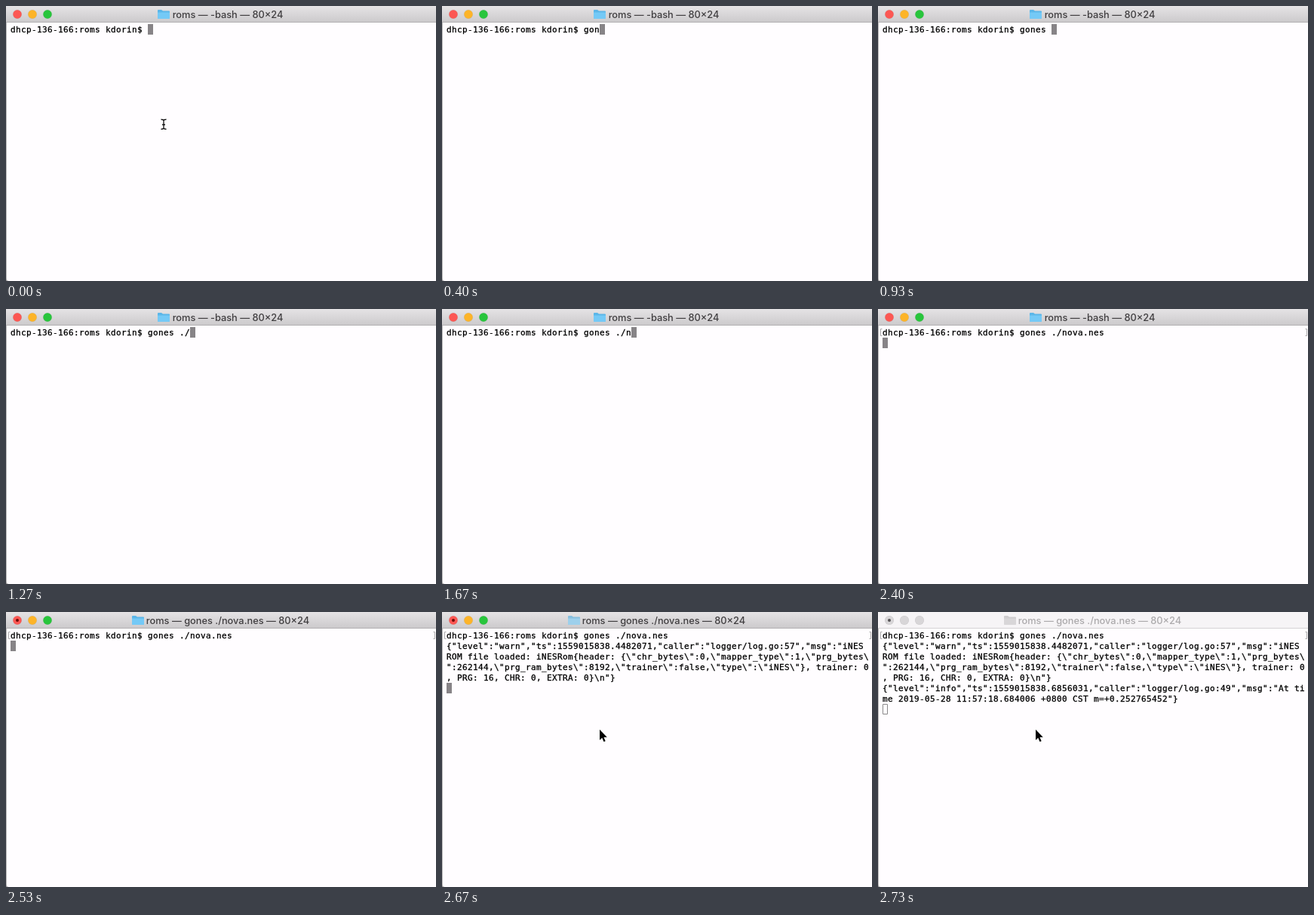
An HTML page with a canvas that plays this animation: 570x365 px, repeating every 2.79 s.

```html
<!DOCTYPE html>
<html lang="en">
<head>
<meta charset="utf-8">
<title>Terminal</title>
<style>
html, body { margin: 0; width: 100%; height: 100%; overflow: hidden; background: #fffdff; }
canvas { display: block; }
</style>
</head>
<body>
<canvas id="stage" width="570" height="365"></canvas>
<script>
const ctx = document.getElementById('stage').getContext('2d');
const LOOP = 2790, COLS = 80, CELL = 7, ROW = 14, LEFT = 6, TOP = 24;

const PROMPT = 'dhcp-136-166:roms kdorin$ ';
const COMMAND = 'gones ./nova.nes ';
const KEYS = [70, 200, 400, 530, 730, 930, 1070, 1270, 1670, 1730, 1870, 1930];
const COMPLETE = 2000, ENTER = 2070, NEWLINE = 2400, RUN = 2530, LOG = 2600, FADE = 2670, BLUR = 2730;

const WARN = String.raw`{"level":"warn","ts":1559015838.4482071,"caller":"logger/log.go:57","msg":"iNES ROM file loaded: iNESRom{header: {\"chr_bytes\":0,\"mapper_type\":1,\"prg_bytes\":262144,\"prg_ram_bytes\":8192,\"trainer\":false,\"type\":\"iNES\"}, trainer: 0, PRG: 16, CHR: 0, EXTRA: 0}\n"}`;
const INFO = '{"level":"info","ts":1559015838.6856031,"caller":"logger/log.go:49","msg":"At time 2019-05-28 11:57:18.684006 +0800 CST m=+0.252765452"}';

const wrap = text => text.match(new RegExp(`.{1,${COLS}}`, 'g'));

function rect(x, y, w, h, color) {
  ctx.fillStyle = color;
  ctx.fillRect(x, y, w, h);
}

function disc(x, y, r, color) {
  ctx.fillStyle = color;
  ctx.beginPath();
  ctx.arc(x, y, r, 0, 7);
  ctx.fill();
}

function stroke(path, color, width = 1) {
  ctx.strokeStyle = color;
  ctx.lineWidth = width;
  ctx.stroke(new Path2D(path));
}

function fill(path, color) {
  ctx.fillStyle = color;
  ctx.fill(new Path2D(path));
}

function folder(x, back, front) {
  fill(`M${x} 16.5V6q0-1 1-1h4l2 1.5h8q1 0 1 1v9z`, back);
  fill(`M${x} 8.5h16v7.5q0 1-1 1h-14q-1 0-1-1z`, front);
}

function titleBar(t) {
  const blurred = t >= BLUR, running = t >= RUN;
  const shade = ctx.createLinearGradient(0, 0, 0, 22);
  shade.addColorStop(0, blurred ? '#f6f4f6' : '#e5e3e5');
  shade.addColorStop(1, blurred ? '#f6f4f6' : '#cbc9cb');
  rect(0, 0, 570, 22, shade);
  rect(0, 21, 570, 1, blurred ? '#d4d2d4' : '#b3b1b3');

  ['#fc5753', '#fdb428', '#28c53c'].forEach((color, i) => {
    disc(15 + 20 * i, 11, 6, blurred ? '#c9c7c9' : 'rgba(0,0,0,.12)');
    disc(15 + 20 * i, 11, 5.7, blurred ? '#d8d6d8' : color);
  });
  if (running) disc(15, 11, 2, blurred ? '#555355' : '#6b0a08');

  const icon = blurred ? ['#cfcdcf', '#d8d6d8'] : t >= FADE ? ['#86bfde', '#9dd0ec'] : ['#5bb6e8', '#74c9f6'];
  folder(running ? 167 : 201, ...icon);
  ctx.font = '500 12.8px Inter, sans-serif';
  ctx.textAlign = 'center';
  ctx.fillStyle = blurred ? '#acaaac' : '#403e40';
  ctx.fillText(`roms — ${running ? 'gones ./nova.nes' : '-bash'} — 80×24`, 294, 16);
}

function terminal(t) {
  const count = t >= COMPLETE ? COMMAND.length : KEYS.filter(k => t >= k).length;
  const lines = [PROMPT + COMMAND.slice(0, count)];
  if (t >= LOG) lines.push(...wrap(WARN));
  if (t >= BLUR) lines.push(...wrap(INFO));

  const entered = t >= NEWLINE;
  const x = LEFT + (entered ? 0 : lines[0].length * CELL);
  const y = TOP + (entered ? lines.length * ROW : 0);
  if (t >= BLUR) stroke(`M${x + .5} ${y + .5}h6v13h-6z`, '#8a888a');
  else rect(x, y, CELL, ROW, '#878487');

  // A hairline outline gives the glyphs their medium weight.
  ctx.font = '11px "DejaVu Sans Mono", monospace';
  ctx.textAlign = 'left';
  ctx.fillStyle = ctx.strokeStyle = '#000';
  ctx.lineWidth = .3;
  lines.forEach((line, r) => [...line].forEach((c, i) => {
    const place = [c, LEFT + i * CELL, TOP + 11 + r * ROW];
    ctx.fillText(...place);
    ctx.strokeText(...place);
  }));

  if (t >= ENTER) stroke('M5.5 26.5h-2v9h2M566.5 26.5h2v9h-2', '#aaa8aa');
}

function pointer(t) {
  if (t < KEYS[0]) {
    const beam = 'M205.5 150.5q3 0 3.5 1.5q.5-1.5 3.5-1.5M209 152v10M205.5 163.5q3 0 3.5-1.5q.5 1.5 3.5 1.5M207 157.5h4';
    stroke(beam, '#111', 1.3);
  } else if (t >= LOG) {
    const arrow = 'M209 156v14l3.2-3l2.3 5.2l2.2-1l-2.3-5h4.4z';
    stroke(arrow, '#fff', 2);
    fill(arrow, '#000');
  }
}

function draw(now) {
  const t = now % LOOP;
  rect(0, 0, 570, 365, '#fffdff');
  titleBar(t);
  terminal(t);
  pointer(t);
  rect(0, 22, 1, 343, '#b9b7b9');
  fill('M0 361q0 4 4 4h-4z', '#8f8d8f');
}

const start = performance.now();
function tick() {
  draw(performance.now() - start);
  requestAnimationFrame(tick);
}
tick();
</script>
</body>
</html>
```
